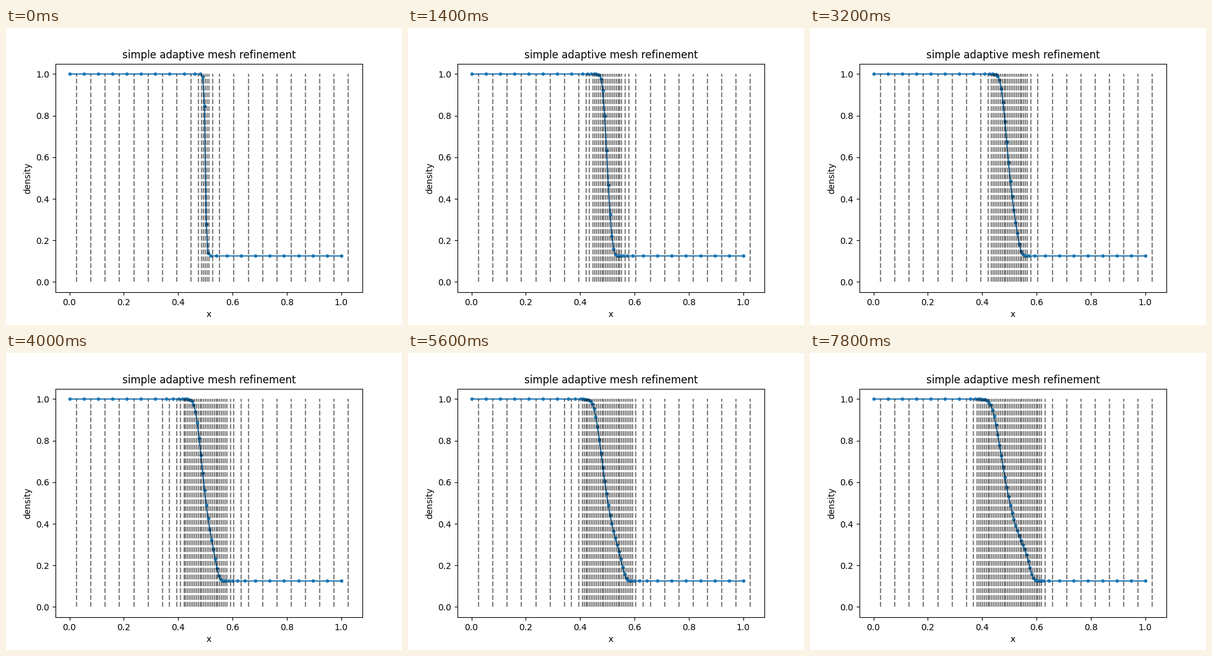
Write a matplotlib script that moves like this. It is 640x480 px and loops after 8000 ms.

```python
import numpy as np
import matplotlib.pyplot as plt
from matplotlib.animation import FuncAnimation

GAMMA = 1.4
CELLS = 20          # coarse cells
FINE = 8            # finest cells per coarse cell
DX = 1 / (CELLS - 1) / FINE
DT = 0.001
TOL = 1e-4          # density jump that triggers refinement
FRAMES = 40


def faces(w):
    """Right face of every cell."""
    return (np.cumsum(w) - FINE / 2) * DX


def centers(w):
    return faces(w) - w * DX / 2


def split(w, u, flag):
    parts = 1 + flag.astype(int)
    return np.repeat(w // parts, parts), np.repeat(u, parts, axis=1)


def refine(w, u):
    jump = np.abs(np.diff(u[0])) > TOL
    flag = np.append(jump, False) | np.append(False, jump)
    w, u = split(w, u, flag & (w > 1))
    # neighbours may differ by one level only
    while True:
        flag = np.append(w[:-1] > 2 * w[1:], False)
        flag |= np.append(False, w[1:] > 2 * w[:-1])
        if not flag.any():
            return w, u
        w, u = split(w, u, flag)


def advance(w, u):
    """One Euler step of the gas equations with the Rusanov flux."""
    rho, mom, energy = u
    v = mom / rho
    p = (GAMMA - 1) * (energy - 0.5 * mom * v)
    f = np.array([mom, mom * v + p, (energy + p) * v])
    speed = np.abs(v) + np.sqrt(GAMMA * p / rho)
    s = np.maximum(speed[:-1], speed[1:])
    flux = 0.5 * (f[:, :-1] + f[:, 1:]) - 0.5 * s * (u[:, 1:] - u[:, :-1])
    flux = np.hstack([f[:, :1], flux, f[:, -1:]])
    return u - DT / (w * DX) * np.diff(flux, axis=1)


def simulate():
    w = np.full(CELLS, FINE)
    left = centers(w) < 0.5
    rho = np.where(left, 1.0, 0.125)
    p = np.where(left, 1.0, 0.1)
    u = np.array([rho, 0 * rho, p / (GAMMA - 1)])
    for _ in range(3):
        w, u = refine(w, u)
    states = []
    for _ in range(FRAMES + 1):
        w, u = refine(w, u)
        u = advance(w, u)
        states.append((centers(w), faces(w), u[0]))
    return states[1:]


states = simulate()

fig, ax = plt.subplots(figsize=(6.4, 4.8), dpi=100)
ax.set_title("simple adaptive mesh refinement")
ax.set_xlabel("x")
ax.set_ylabel("density")
end = 1 + DX * FINE / 2
ax.set_xlim(-0.05 * end, 1.05 * end)
ax.set_ylim(-0.05, 1.05)
curve, = ax.plot([], [], ".-", color="C0")
mesh = ax.vlines([], 0, 1, colors="k", linestyles="--", alpha=0.5, zorder=3)


def draw(i):
    x, edges, rho = states[i]
    curve.set_data(x, rho)
    mesh.set_segments([[(e, 0), (e, 1)] for e in edges])
    return curve, mesh


anim = FuncAnimation(fig, draw, frames=FRAMES, interval=200,
                     repeat=True, repeat_delay=0)
plt.show()
```
